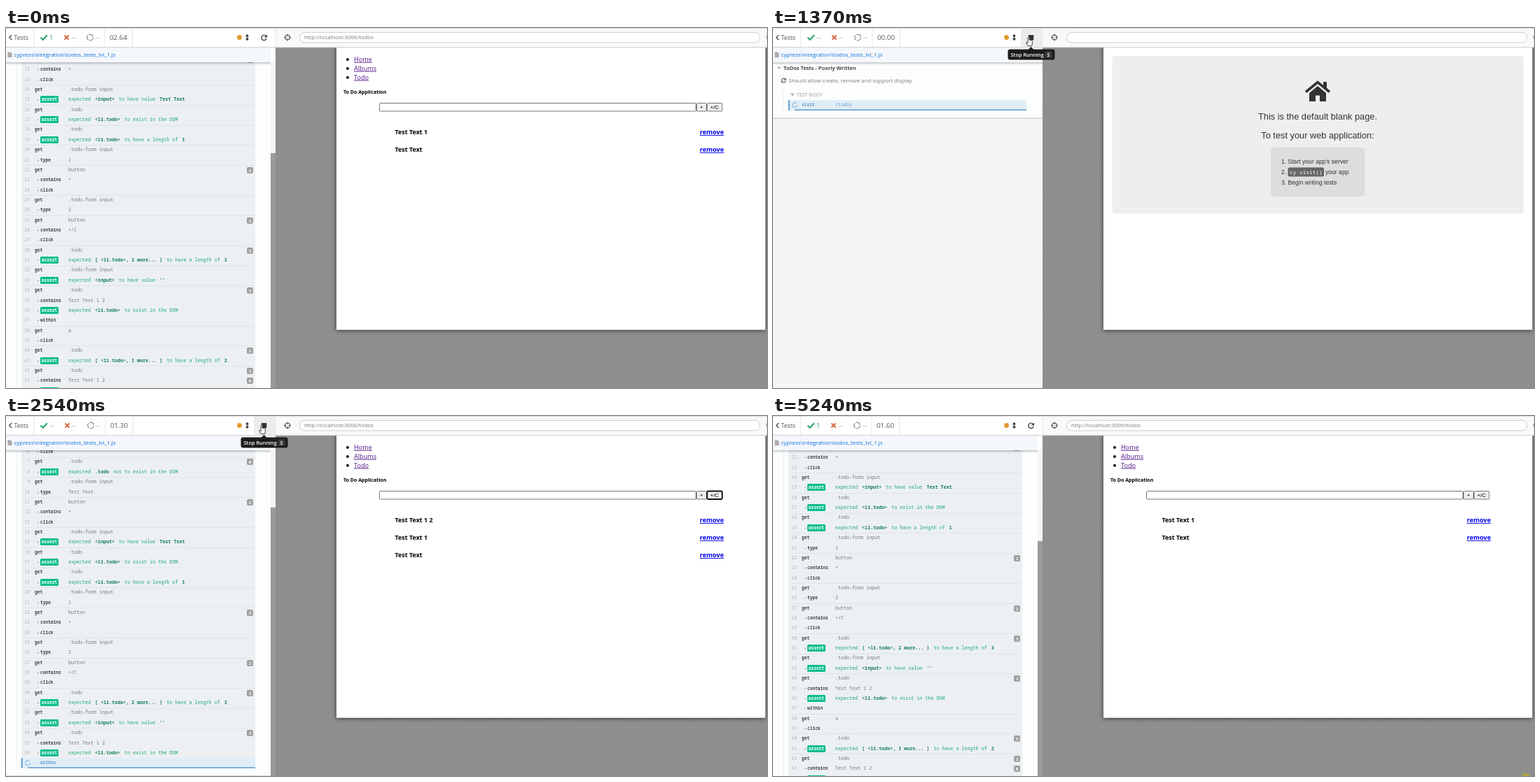
Recreate the animation shown at these times as an HTML page. Size 1087 by 515 pixels, loop 5.33 s.

```html
<!DOCTYPE html>
<html lang="en">
<head>
<meta charset="utf-8">
<title>Test runner</title>
<style>
html, body { margin: 0; width: 100%; height: 100%; overflow: hidden; background: #fff; }
svg { display: block; width: 1087px; height: 515px; }
text { font-family: "Open Sans", "Noto Sans", sans-serif; white-space: pre; }
.mono { font-family: "Noto Sans Mono", "DejaVu Sans Mono", monospace; }
.arial { font-family: "Liberation Sans", Arial, sans-serif; }
</style>
</head>
<body>
<svg viewBox="0 0 1087 515">
  <defs>
    <pattern id="weave" width="4" height="4" patternUnits="userSpaceOnUse">
      <rect width="4" height="4" fill="#969696"/>
      <path d="M-1 3l2 2M0 0l4 4M3-1l2 2" stroke="#868686" stroke-width="1.3"/>
    </pattern>
    <filter id="soft" x="-10%" y="-10%" width="120%" height="120%">
      <feDropShadow dx="0" dy="1" stdDeviation="3" flood-color="#333"/>
    </filter>
    <linearGradient id="fade" x2="0" y2="1">
      <stop stop-color="#000" stop-opacity=".22"/><stop offset="1" stop-color="#000" stop-opacity="0"/>
    </linearGradient>
    <clipPath id="below"><rect y="49" width="385" height="466"/></clipPath>
  </defs>
  <rect x="385" y="28" width="702" height="487" fill="url(#weave)"/>
  <rect x="472" y="20" width="612.500" height="411.700" fill="#fff" filter="url(#soft)"/>
  <g id="page"></g>
  <g id="log" clip-path="url(#below)"></g>
  <g id="bar"></g>
  <g id="pointer"></g>
</svg>
<script>
const LOOP = 5330, ROW = 14.36, TOP = 103.4, MAX_SCROLL = 209;
const CLICK = 830, DONE = 2770, LEAVE = 4480, GONE = 4540;

// "-" marks a child command, "#n" a badge, *...* an emphasised value
const commands = `visit /todos
get .todo #0
-assert expected *.todo* not to exist in the DOM
get button #2
-contains +
-click
get .todo #0
-assert expected *.todo* not to exist in the DOM
get .todo-form input
-type Test Text
get button #2
-contains +
-click
get .todo-form input
-assert expected *<input>* to have value *Test Text*
get .todo
-assert expected *<li.todo>* to exist in the DOM
get .todo
-assert expected *<li.todo>* to have a length of *1*
get .todo-form input
-type 1
get button #2
-contains +
-click
get .todo-form input
-type 2
get button #2
-contains +/C
-click
get .todo #3
-assert expected *[ <li.todo>, 2 more... ]* to have a length of *3*
get .todo-form input
-assert expected *<input>* to have value *''*
get .todo #3
-contains Test Text 1 2
-assert expected *<li.todo>* to exist in the DOM
-within
get a
-click
get .todo #2
-assert expected *[ <li.todo>, 1 more... ]* to have a length of *2*
get .todo #2
-contains Test Text 1 2 #0
-assert expected *[ <li.todo>, 1 more... ]* not to contain *Test Text 1 2*`.split('\n').map(line => {
  const [, child, name, msg, badge] = line.match(/^(-?)(\w+) ?(.*?)(?: ?#(\d))?$/);
  return { child, name, msg, badge };
});

// time, rows shown, input value, number of todos, focused control
const steps = [
  [1230, 1, '', 0, ''], [1460, 3, '', 0, ''], [1540, 6, '', 0, 'add'], [1620, 8, '', 0, 'add'],
  [1690, 10, 'Test', 0, 'input'], [1770, 10, 'Test Text', 0, 'input'], [1850, 13, 'Test Text', 1, 'add'],
  [1930, 15, 'Test Text', 1, 'add'], [2000, 19, 'Test Text', 1, 'add'], [2080, 21, 'Test Text 1', 1, 'input'],
  [2160, 24, 'Test Text 1', 2, 'add'], [2230, 26, 'Test Text 1', 2, 'input'], [2310, 26, 'Test Text 1 2', 2, 'input'],
  [2390, 29, '', 3, 'clear'], [2460, 33, '', 3, 'clear'], [2540, 37, '', 3, 'clear'],
  [2620, 39, '', 2, ''], [2690, 42, '', 2, ''], [2770, 44, '', 2, '']
];
const finalStep = steps[steps.length - 1];
const blank = [0, 0, '', 0, ''];

const esc = s => s.replace(/&/g, '&amp;').replace(/</g, '&lt;');
const text = (x, y, size, fill, s, more = '') =>
  `<text x="${x}" y="${y}" font-size="${size}" fill="${fill}" ${more}>${esc(String(s))}</text>`;
const rect = (x, y, w, h, fill, more = '') =>
  `<rect x="${x}" y="${y}" width="${w}" height="${h}" fill="${fill}" ${more}/>`;
const line = (d, stroke, width = 1, more = '') =>
  `<path d="${d}" fill="none" stroke="${stroke}" stroke-width="${width}" ${more}/>`;
const shape = (d, fill, more = '') => `<path d="${d}" fill="${fill}" ${more}/>`;
const mono = 'class="mono"', arial = 'class="arial"';

function stepAt(t) {
  if (t < CLICK) return finalStep;
  let now = blank;
  for (const s of steps) if (t >= s[0]) now = s;
  return now;
}

function assertion(msg, y) {
  const spans = msg.split('*').filter(Boolean).map((part, i) =>
    `<tspan ${i ? 'dx="6"' : ''} ${i % 2 ? 'font-weight="700" fill="#147d5c"' : ''}>${esc(part.trim())}</tspan>`);
  return `<text x="89" y="${y}" font-size="6.7" fill="#1ca87b" ${mono}>${spans.join('')}</text>`;
}

function commandRow(c, i, right, active) {
  // whole-pixel centres keep tags and badges crisp
  const top = TOP + i * ROW, mid = Math.round(top + ROW / 2 - .25), base = mid + 2.3;
  let out = '';
  if (active) {
    out += rect(22, top, right - 22, ROW, '#e0edf7') + rect(22, top, 1.5, ROW, '#3f88c5')
      + rect(31, top + ROW - 1.2, right - 31, 1.2, '#3f88c5')
      + line(`M33.5 ${mid - 2}a3.3 3.3 0 1 0 .8 2.5`, '#6ba6d5', 1);
  } else {
    if (!c.child && i) out += rect(22, Math.round(top), right - 22, 1, '#e0e5e7');
    out += text(34, base, 6.4, '#b0b6bb', i + 1, mono + ' text-anchor="end"');
  }
  const ink = active ? '#5f9fd1' : '#444';
  if (c.child) out += text(44, base, 6.2, ink, '-', mono);
  if (c.name === 'assert') {
    out += rect(49, mid - 5, 26, 10, '#08bd8c', 'rx="1.5"')
      + text(50.8, base, 6.2, '#fff', 'assert', mono + ' font-weight="600"') + assertion(c.msg, base);
  } else {
    out += text(c.child ? 49 : 41, base, 6.2, ink, c.name, mono + ' font-weight="600"')
      + text(89, base, 6.7, active ? '#5f9fd1' : '#777', c.msg, mono);
  }
  if (c.badge) {
    out += rect(right - 12, mid - 4, 9, 9, '#a0a0a0', 'rx="2"')
      + text(right - 7.5, base + .4, 6, '#fff', c.badge, mono + ' text-anchor="middle" font-weight="700"');
  }
  return out;
}

const spinArrows = (x, y, r, color) =>
  line(`M${x - r} ${y - .5}a${r} ${r} 0 0 1 ${1.8 * r}-1.3M${x + r} ${y + .5}a${r} ${r} 0 0 1 ${-1.8 * r} 1.3`, color, 1.1)
  + shape(`M${x + r + .6} ${y - 3.6}v3.2h-3.2zM${x - r - .6} ${y + 3.6}v-3.2h3.2z`, color);

function drawLog(rows, running) {
  const bottom = rows ? TOP + rows * ROW + 11.2 : 121.5;
  const scroll = running ? Math.min(MAX_SCROLL, Math.max(0, Math.round(bottom - 515))) : MAX_SCROLL;
  const right = scroll ? 356 : 362;
  let out = rect(0, 28, 385, 487, '#f5f5f5') + `<g transform="translate(0 ${-scroll})">`
    + rect(0, 28, 385, bottom - 28, '#fcfefe') + rect(0, bottom - .5, 385, 1.2, '#c8c8c8')
    + shape('M6 55.5h5.4l-2.7 3.4z', '#aaa')
    + text(15, 60, 7.7, '#222', 'ToDos Tests - Poorly Written', 'font-weight="600"')
    + spinArrows(15.2, 75.2, 2.9, '#555')
    + text(22, 77.8, 7.8, '#777', 'Should allow create, remove and support display')
    + rect(14.5, 88, 1, (rows ? bottom - 12 : 110) - 88, '#ebeeee');
  if (!rows) {
    out += rect(21.5, 87.5, 340.5, 23, '#f4f4f4', 'stroke="#e2e2e2" rx="2"')
      + text(27, 101.3, 7.45, '#888', 'No commands were issued in this test.');
  } else {
    out += shape('M25 93.8h5.4l-2.7 3.6z', '#aaa') + text(34, 98, 7.1, '#999', 'TEST BODY')
      + rect(22, TOP, right - 22, rows * ROW, '#ecf0f2');
    for (let i = 0; i < rows; i++) out += commandRow(commands[i], i, right, running && i === rows - 1);
  }
  out += '</g>';
  if (scroll) {
    const thumb = 50 + 129 * scroll / MAX_SCROLL;
    out += rect(378, 28, 7, 487, '#f5f5f5') + rect(378, thumb, 7, 515 - thumb, '#9a9a9a');
  }
  return out;
}

function drawHome() {
  const center = arial + ' text-anchor="middle"';
  return rect(484.5, 40, 587.5, 225.5, '#eee', 'rx="4"')
    + line('M761 91.5L778 77.5L795 91.5', '#333', 3.6)
    + shape('M786 77h5v10h-5zM766 93l12-10 12 10v12h-9v-8.500h-6v8.500h-9z', '#333')
    + text(778, 130.5, 12.8, '#333', 'This is the default blank page.', center)
    + text(778, 157.5, 12.8, '#333', 'To test your web application:', center)
    + rect(711, 171, 134.5, 70, '#ddd', 'rx="5"')
    + ['1.', '2.', '3.'].map((n, i) => text(726, 194 + i * 14.8, 8.6, '#333', n, arial)).join('')
    + text(735.5, 194, 8.6, '#333', "Start your app's server", arial)
    + rect(735.5, 199.5, 51.5, 13, '#666', 'rx="2"')
    + text(738, 208.6, 7.8, '#fff', 'cy.visit()', mono)
    + text(789, 208.8, 8.6, '#333', 'your app', arial)
    + text(735.5, 223.6, 8.6, '#333', 'Begin writing tests', arial);
}

function drawApp(value, count, focus) {
  const box = (id, x, w, fill) => rect(x, 107.5, w, 11.5, fill,
    focus === id ? 'stroke="#101010" stroke-width="1.8" rx="1.5"' : 'stroke="#767676" rx="1"');
  let out = ['Home', 'Albums', 'Todo'].map((s, i) =>
    `<circle cx="488" cy="${45 + i * 12.9}" r="2" fill="#111"/>`
    + text(497, 47.8 + i * 12.9, 9.1, '#551a8b', s, 'text-decoration="underline"')).join('');
  out += text(482, 93.7, 7.06, '#000', 'To Do Application', 'font-weight="700"')
    + box('input', 533.5, 452, '#fff') + box('add', 986.5, 14, '#efefef') + box('clear', 1001.5, 21.5, '#efefef')
    + text(536, 115.8, 7.9, '#000', value, arial)
    + text(993.3, 115.6, 7.9, '#000', '+', arial + ' text-anchor="middle"')
    + text(1012, 115.6, 7.9, '#000', '+/C', arial + ' text-anchor="middle"');
  if (value === 'Test Text 1 2') out += rect(582.2, 109, .8, 8.5, '#000');
  ['Test Text 1 2', 'Test Text 1', 'Test Text'].slice(3 - count).forEach((s, i) => {
    const y = 152 + i * 25;
    out += text(555.5, y, 8.95, '#000', s, 'font-weight="700"')
      + text(991, y, 9.15, '#00e', 'remove', 'font-weight="700" text-decoration="underline"');
  });
  return out;
}

function drawBar(clock, running, hover, url, wide) {
  const s = running ? 1 : 0, ink = '#555';
  let out = rect(0, 28, wide, 21, '#f4f7fb') + rect(0, 49, wide, 4, 'url(#fade)')
    + shape('M2.500 34.500h4l2 2v5.500h-6z', '#aaa')
    + text(11.5, 41, 8, '#0b6fe0', 'cypress\\integration\\todos_tests_lvl_1.js')
    + rect(0, 0, 385, 28, '#fff') + rect(385, 0, 702, 28, '#f9f9f9')
    + rect(0, 0, 1087, .8, '#d5d5d5') + rect(0, 27.3, 1087, .9, '#c6c6c6');
  if (hover) out += rect(354, 1, 30.5, 26.3, '#ececec');
  for (const x of [39.5, 140.5 + s, 180 + s, 384.5]) out += rect(x, 1, .8, 26.5, '#e0e0e0');
  out += line('M8.300 10l-3.600 3.500 3.600 3.500', ink, 1.4) + text(11.5, 16.6, 8.7, ink, 'Tests')
    + line('M49.500 13.500l3.300 3.200 6-6.400', '#27a36a', 2.1)
    + text(62, 16.8, 9.5, running ? '#8a9a92' : '#27a36a', running ? '--' : '1')
    + line(`M${83.5 + s} 10.500l6 6m0-6l-6 6`, '#d5673f', 1.9)
    + text(94, 16.8, 9.5, '#d08a70', '--')
    + `<circle cx="${120 + s}" cy="13.500" r="4.300" fill="none" stroke="#888" stroke-width="1.200" stroke-dasharray="7.500 1.500"/>`
    + text(128 + s, 16.8, 9.5, '#aaa', '--')
    + text(148 + s, 17, 9.8, '#555', clock)
    + '<circle cx="333.500" cy="13.500" r="3.400" fill="#e39a2d"/>'
    + line('M344.500 11v5', '#333', 1.4) + shape('M342 12l2.500-3.300 2.500 3.300zM342 15l2.500 3.300 2.500-3.300z', '#333');
  out += running ? rect(365, 10, 7.3, 7.3, '#333')
    : line('M371.500 11.600a3.700 3.700 0 1 0 .6 3.300', '#444', 1.4) + shape('M373 9.200v4.300h-4.300z', '#444');
  out += '<circle cx="402" cy="13.500" r="3.500" fill="none" stroke="#555" stroke-width="1.100"/>'
    + line('M402 8.500v3.500m0 3v3.500M397 13.500h3.500m3 0h3.500', '#555', 1.1)
    + rect(419.5, 6.3, 657.5, 14.6, '#fff', 'rx="7.3" stroke="#ccc"')
    + text(426, 16.3, 7.8, '#777', url) + text(1084, 16.3, 7.8, '#777', '1');
  if (hover) {
    const key = running ? 'S' : 'R', x = running ? 335.5 : 337;
    out += shape('M364.500 31l4-4 4 4z', '#1c1c1c') + rect(x, 30.5, 402.5 - x, 15, '#1c1c1c', 'rx="3"')
      + text(x + 4, 40.7, 7.35, '#fff', running ? 'Stop Running' : 'Run All Tests', 'font-weight="600"')
      + rect(388.5, 33.5, 10, 9.5, '#3c3c3c', 'rx="1.5"')
      + text(393.5, 40.7, 7, '#fff', key, 'text-anchor="middle" font-weight="600"');
  }
  return out;
}

const outline = 'stroke="#111" stroke-width=".8" stroke-linejoin="round"';
const at = (x, y, d) => `<g transform="translate(${x} ${y})">${shape(d, '#fff', outline)}</g>`;
const arrow = (x, y) => at(x, y, 'M0 0v9.700l2.200-2 1.500 3.600 1.500-.6-1.500-3.500h3z');
const hand = (x, y) => at(x, y,
  'M0 0c.8-.8 1.800-.4 1.800.6v3.600l1.600.2 1.500.5 1.200.7v4.400l-1 2.700h-5l-2.700-4c-.7-1.200.6-1.700 1.300-1l1.100 1v-8z');

function drawPointer(t) {
  if (t >= 5240) return '<circle cx="1075.500" cy="518" r="6.800" fill="#b3a83c"/>';
  if (t < 70 || t >= GONE) return '';
  if (t >= LEAVE) return arrow(437, 118);
  if (t < 590) {
    const p = (t - 70) / 520, e = p * p * (3 - 2 * p);
    return arrow(914 - 551 * e, 506 - 494 * e);
  }
  const plain = t < 670 || (t >= 1000 && t < 1310);
  return plain ? arrow(363, 12.5) : hand(364.3, 13);
}

const shown = {};
function put(id, markup) {
  if (shown[id] === markup) return;
  shown[id] = markup;
  document.getElementById(id).innerHTML = markup;
}

function render(t) {
  const [, rows, value, todos, focus] = stepAt(t);
  const running = t >= CLICK && t < DONE;
  const home = t >= 900 && t < 1460;
  const seconds = Math.min(1.6, Math.max(0, (t - 1298) / 920));
  const clock = t < CLICK ? '02.64' : '0' + (Math.floor(seconds * 10 + 1e-6) / 10).toFixed(2);
  const scrolled = !running || TOP + rows * ROW + 11.2 > 515;
  put('page', home ? drawHome() : drawApp(value, t < 900 ? 2 : todos, focus));
  put('log', drawLog(rows, running));
  put('bar', drawBar(clock, running, t >= 590 && t < LEAVE, home ? '' : 'http://localhost:3000/todos', scrolled ? 378 : 385));
  put('pointer', drawPointer(t));
}

const start = performance.now();
function tick() {
  render((performance.now() - start) % LOOP);
  requestAnimationFrame(tick);
}
tick();
</script>
</body>
</html>
```
